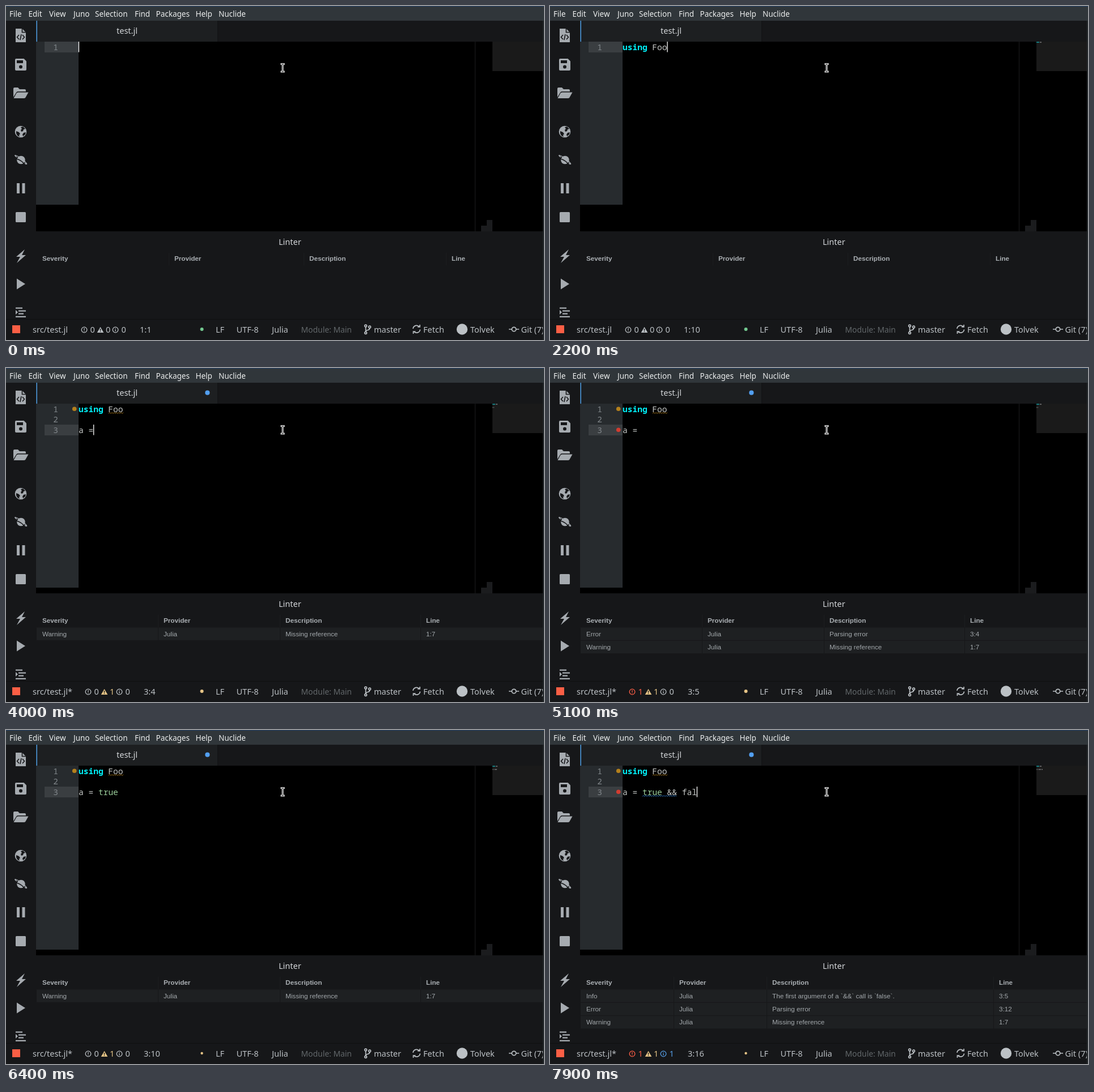
An HTML page that plays this animation: 949x590 px, repeating every 8000 ms.

```html
<!DOCTYPE html>
<html lang="en">
<head>
<meta charset="utf-8">
<title>Editor with linter</title>
<style>
  html, body { margin: 0; width: 100%; height: 100%; overflow: hidden; background: #161719; }
  svg { display: block; width: 949px; height: 590px; }
  text { white-space: pre; }
  .ui { font: 14.5px "Noto Sans", "Open Sans", sans-serif; fill: #bcc1c5; }
  .menu { font: 13.5px "Noto Sans", "Open Sans", sans-serif; fill: #eceeee; }
  .code { font: 14.55px "Noto Sans Mono", "DejaVu Sans Mono", monospace; fill: #c5c8c6; }
  .num { fill: #80868a; text-anchor: end; }
  .key { fill: #00f0f8; font-weight: 700; }
  .bool { fill: #99cc99; }
  .table { font: 11.7px "Liberation Sans", Arial, sans-serif; fill: #a3a8ac; }
  .head { font-weight: 700; fill: #abb0b4; }
  .icon { fill: #a6abb0; }
  .line { fill: none; stroke: #bcc1c5; stroke-width: 1.7; }
  .cut { fill: none; stroke: #161719; stroke-width: 1.6; }
</style>
</head>
<body>
<svg viewBox="0 0 949 590">
  <rect width="949" height="590" fill="#161719"/>
  <rect width="949" height="26" fill="#30363a"/>
  <rect width="949" height="1" fill="#203b60"/>
  <g id="menu" class="menu"></g>

  <rect x="53" y="26" width="320" height="37" fill="#1d1f21"/>
  <rect x="53.500" y="26" width="1.500" height="37" fill="#4f9fe8"/>
  <rect x="373" y="26" width="1" height="37" fill="#101113"/>
  <text class="ui" x="195" y="49" style="fill:#d2d5d8">test.jl</text>

  <rect x="53" y="63" width="896" height="335" fill="#000"/>
  <rect x="827" y="63" width="1" height="335" fill="#1b1c1d"/>
  <rect x="858" y="63" width="91" height="52" fill="#1a1a1a"/>
  <path d="M848 378h10v20h-20v-10h10z" fill="#1b1c1e"/>
  <text class="ui" x="481" y="422" style="fill:#d2d5d8">Linter</text>
  <rect y="553" width="949" height="1" fill="#0e0f10"/>

  <g class="icon">
    <path d="M17 40h11.500l6.500 6.500v17.500h-18z"/>
    <path class="cut" d="M28.500 40v6.500h6.500M23 51l-3.500 4 3.500 4M29 51l3.500 4-3.500 4M27 50l-2 10" stroke-width="1.4"/>
    <path d="M18 93h13.500l4.500 4.500v14.500q0 2-2 2h-16q-2 0-2-2v-17q0-2 2-2z"/>
    <path d="M19 96h11v5h-11z" fill="#161719"/><circle cx="26" cy="107.500" r="3" fill="#161719"/>
    <path d="M13 161v-15q0-2 2-2h6l3 3h9q2 0 2 2v2h-14q-2 0-3 2z"/>
    <path d="M13.500 163l5-9q1-1.500 3-1.500h18l-5 9q-1 1.500-3 1.500z"/>
    <circle cx="26" cy="222" r="10.300"/>
    <path d="M26 214l4-1 4 4-3 1-1 3-3 1-1-3 2-2zM18 221l5 2 2 3-2 2 1 3-4-2-2-4zM31 224l4-1-1 4-4 3-1-3z" fill="#161719"/>
    <circle cx="26.500" cy="272" r="7.300"/>
    <path d="M19 267c-7-5-1-4 7 2s15 13 7 9" fill="none" stroke="#a6abb0" stroke-width="1.500"/>
    <path class="cut" d="M19 270q9 3 14 10" stroke-width="1"/>
    <path d="M19 313h5v18h-5zM28.500 313h5v18h-5z"/>
    <rect x="17" y="364" width="18" height="18" rx="1.500"/>
    <path d="M33 430l-15 13h7l-6 11 16-14h-7z"/>
    <path d="M19 481.500l15 9.500-15 9.500z"/>
    <path d="M17 532.500h12v2.300h-12zM22 537.500h13v2.300h-13zM22 542.500h9v2.300h-9zM17 547.700h18v2.300h-18zM17 537l4 4-4 4z"/>
  </g>

  <rect x="11" y="564" width="14" height="14" fill="#fb5f45"/>
  <g id="labels" class="ui"></g>
  <g class="line">
    <circle cx="634.500" cy="565" r="1.900"/><circle cx="634.500" cy="577.500" r="1.900"/><circle cx="641.500" cy="567" r="1.900"/>
    <path d="M634.500 567v8.500M641.500 569q0 3-3.500 3.500-3.500.5-3.500 3"/>
    <path d="M718 570a6.300 6.300 0 0 1 11-3.500M730.500 571.500a6.300 6.300 0 0 1-11 3.500M730 563v4h-4M718.500 579v-4h4"/>
    <circle cx="896" cy="571" r="3.700"/><path d="M887 571h5M900 571h5"/>
  </g>
  <circle cx="804.500" cy="571" r="9.700" fill="#bcc1c5"/>

  <g id="live"></g>
  <rect x="947" y="26" width="2" height="564" fill="#24282b"/>
  <g fill="none" stroke-linecap="square">
    <path id="beam" d="M486 102.500h4M488 102.500v13.500M486 116h4" stroke="#fff" stroke-width="3"/>
    <path d="M486 102.500h4M488 102.500v13.500M486 116h4" stroke="#000" stroke-width=".8"/>
  </g>
</svg>
<script>
const LOOP = 8000, CHAR = 8.73, LEFT = 128, TOP = 63, ROW = 18.5;
const YELLOW = '#e5c486', RED = '#ff5f47', BLUE = '#569fe8', GREY = '#bcc1c5';
const byId = id => document.getElementById(id);
const esc = s => s.replace(/&/g, '&amp;');
const label = (x, y, s, attrs = '') => `<text x="${x}" y="${y}" ${attrs}>${esc(s)}</text>`;
const rect = (x, y, w, h, fill) => `<rect x="${x}" y="${y}" width="${w}" height="${h}" fill="${fill}"/>`;
const dot = (x, y, r, fill) => `<circle cx="${x}" cy="${y}" r="${r}" fill="${fill}"/>`;

byId('menu').innerHTML = [[6, 'File'], [39.5, 'Edit'], [76, 'View'], [119, 'Juno'], [157, 'Selection'],
  [227, 'Find'], [264.5, 'Packages'], [334.5, 'Help'], [375, 'Nuclide']]
  .map(([x, s]) => label(x, 18.5, s)).join('');
byId('labels').innerHTML = [[370, 'LF'], [406.5, 'UTF-8'], [469, 'Julia'], [649, 'master'],
  [736, 'Fetch'], [819, 'Tolvek'], [908.5, 'Git (7)']]
  .map(([x, s]) => label(x, 576.5, s)).join('')
  + label(520.5, 576.5, 'Module: Main', 'style="fill:#62676a;font-size:13.9px"');

const warning = ['Warning', 'Julia', 'Missing reference', '1:7'];
const parsing = at => ['Error', 'Julia', 'Parsing error', at];
const info = ['Info', 'Julia', 'The first argument of a `&&` call is `false`.', '3:5'];

// Each step overrides part of the state from its time on.
const steps = [
  [0, { lines: [''], caret: true, mini: [], issues: [], dirty: false, dotColor: '#73c990', dotSize: 3 }],
  [200, { caret: false }],
  [600, { caret: true }],
  [800, { lines: ['u'] }],
  [1100, { lines: ['us'] }],
  [1200, { lines: ['usi'] }],
  [1300, { lines: ['usin'], mini: ['us'] }],
  [1500, { lines: ['using'], mini: ['usi'] }],
  [1700, { lines: ['using '], mini: ['using'] }],
  [1800, { lines: ['using F'] }],
  [2000, { lines: ['using Fo'] }],
  [2200, { lines: ['using Foo'], mini: ['using Foo'] }],
  [2800, { lines: ['using Foo', ''], dirty: true }],
  [3000, { lines: ['using Foo', '', ''], dotColor: YELLOW }],
  [3100, { issues: [warning] }],
  [3500, { lines: ['using Foo', '', 'a'] }],
  [3700, { lines: ['using Foo', '', 'a '] }],
  [3900, { lines: ['using Foo', '', 'a ='] }],
  [4000, { mini: ['using Foo', '', 'a ='] }],
  [4200, { issues: [parsing('3:4'), warning] }],
  [4300, { caret: false }],
  [4400, { caret: true, dotSize: 2.2 }],
  [4800, { lines: ['using Foo', '', 'a = '], dotSize: 3 }],
  [5100, { caret: false }],
  [5200, { lines: ['using Foo', '', 'a = t'], caret: true }],
  [5300, { lines: ['using Foo', '', 'a = tr'] }],
  [5400, { lines: ['using Foo', '', 'a = tru'] }],
  [5600, { lines: ['using Foo', '', 'a = true'] }],
  [5800, { mini: ['using Foo', '', 'a = true'] }],
  [6000, { lines: ['using Foo', '', 'a = true '], issues: [warning] }],
  [6400, { caret: false, dotSize: 2.2 }],
  [6500, { lines: ['using Foo', '', 'a = true &'], caret: true }],
  [6700, { lines: ['using Foo', '', 'a = true &&'] }],
  [6900, { dotSize: 3 }],
  [7100, { lines: ['using Foo', '', 'a = true && '] }],
  [7200, { mini: ['using Foo', '', 'a = true &&'] }],
  [7400, { lines: ['using Foo', '', 'a = true && f'], dotSize: 2.2 }],
  [7500, { issues: [info, parsing('3:12'), warning] }],
  [7600, { lines: ['using Foo', '', 'a = true && fa'] }],
  [7900, { lines: ['using Foo', '', 'a = true && fal'] }]
];

function squiggle(x, end, y, color) {
  let d = `M${x} ${y + 1}`;
  for (let i = 0; x + 2 <= end; i++, x += 2) d += `l2 ${i % 2 ? 2 : -2}`;
  return `<path d="${d}" fill="none" stroke="${color}" stroke-width=".9"/>`;
}

function editor(s) {
  const last = s.lines.length - 1, y = TOP + last * ROW;
  const has = kind => s.issues.some(row => row[0] === kind);
  let out = rect(53, TOP, 75, 288 + last * ROW, '#272b2e') + rect(68, y, 60, 19, '#3a3e41');
  s.lines.forEach((line, i) => {
    const base = 77.5 + i * ROW;
    const body = esc(line).replace(/\busing\b/, '<tspan class="key">$&</tspan>')
      .replace(/\btrue\b/, '<tspan class="bool">$&</tspan>');
    out += label(92, base, String(i + 1), 'class="code num"')
      + `<text class="code" x="${LEFT}" y="${base}">${body}</text>`;
  });
  if (has('Warning')) out += dot(120.7, 72.3, 3.8, '#b4801c') + squiggle(181, 207, 79.5, '#b4801c');
  if (has('Error')) out += dot(120.7, 109.3, 3.8, '#d23c30');
  if (has('Info')) out += squiggle(163, 224, 116.5, '#2f83d8');
  if (s.caret) out += rect(LEFT + s.lines[last].length * CHAR - .2, y, 1.3, 18.5, '#fff');
  s.mini.forEach((line, i) => [...line].forEach((c, x) => {
    const color = i === 0 && x < 5 ? '#16a9ae' : '#808386';
    if (c !== ' ') out += rect(858 + x, 63.3 + i * 2.8, .9, 1.5, color);
  }));
  return out;
}

function linter({ issues }) {
  const cols = !issues.length ? [64, 297, 535, 786]
    : issues.includes(info) ? [64, 228, 392, 792] : [64, 278, 493, 741];
  let out = '';
  ['Severity', 'Provider', 'Description', 'Line'].forEach((s, i) => {
    out += label(cols[i], 450.3, s, 'class="table head"');
    if (i) out += rect(cols[i] - 10, 436, 1, 22, '#1c1e20');
  });
  issues.forEach((row, r) => {
    const y = 458.5 + r * 23.3;
    out += rect(54, y, 893, 22.3, '#1e2022');
    row.forEach((s, i) => {
      out += label(cols[i], y + 15, s, 'class="table"');
      if (i) out += rect(cols[i] - 10, y, 1, 22.3, '#161719');
    });
  });
  return out;
}

function badge(x, color, flip) {
  const marks = flip ? 'M0 -.8v3.600M0 -3v1.300' : 'M0 -3v3.600M0 1.700v1.300';
  return `<g transform="translate(${x} 572)" fill="none" stroke="${color}" stroke-width="1.300">
    <circle r="4.800"/><path d="${marks}"/></g>`;
}

function status(s) {
  const shift = s.dirty ? 7 : 0, last = s.lines.length;
  const counts = ['Error', 'Warning', 'Info'].map(k => s.issues.filter(row => row[0] === k).length);
  const tint = [RED, YELLOW, BLUE].map((c, i) => counts[i] ? c : GREY);
  let out = label(47, 576.5, 'src/test.jl' + (s.dirty ? '*' : ''), 'class="ui"');
  out += badge(138 + shift, tint[0]) + badge(193 + shift, tint[2], true);
  out += `<path transform="translate(${166.5 + shift} 572)" d="M0 -5l5.800 10h-11.600z" fill="${tint[1]}"/>`
    + rect(165.8 + shift, 570, 1.4, 3.5, '#161719') + rect(165.8 + shift, 574.4, 1.4, 1.3, '#161719');
  [148.5, 176, 203.5].forEach((x, i) => {
    out += label(x + shift, 576.5, String(counts[i]), `class="ui" style="fill:${tint[i]}"`);
  });
  out += label(236 + shift, 576.5, `${last}:${s.lines[last - 1].length + 1}`, 'class="ui"');
  out += dot(345.5, 571, s.dotSize, s.dotColor);
  if (s.dirty) out += dot(355.3, 43.7, 4.1, '#529ff2');
  return out;
}

let shown = 0;
const start = performance.now();
function frame() {
  const t = Math.max(0, performance.now() - start) % LOOP;
  const past = steps.filter(([at]) => at <= t);
  if (past.length !== shown) {
    shown = past.length;
    const state = Object.assign({}, ...past.map(([, change]) => change));
    byId('live').innerHTML = editor(state) + linter(state) + status(state);
  }
  requestAnimationFrame(frame);
}
frame();
</script>
</body>
</html>
```
